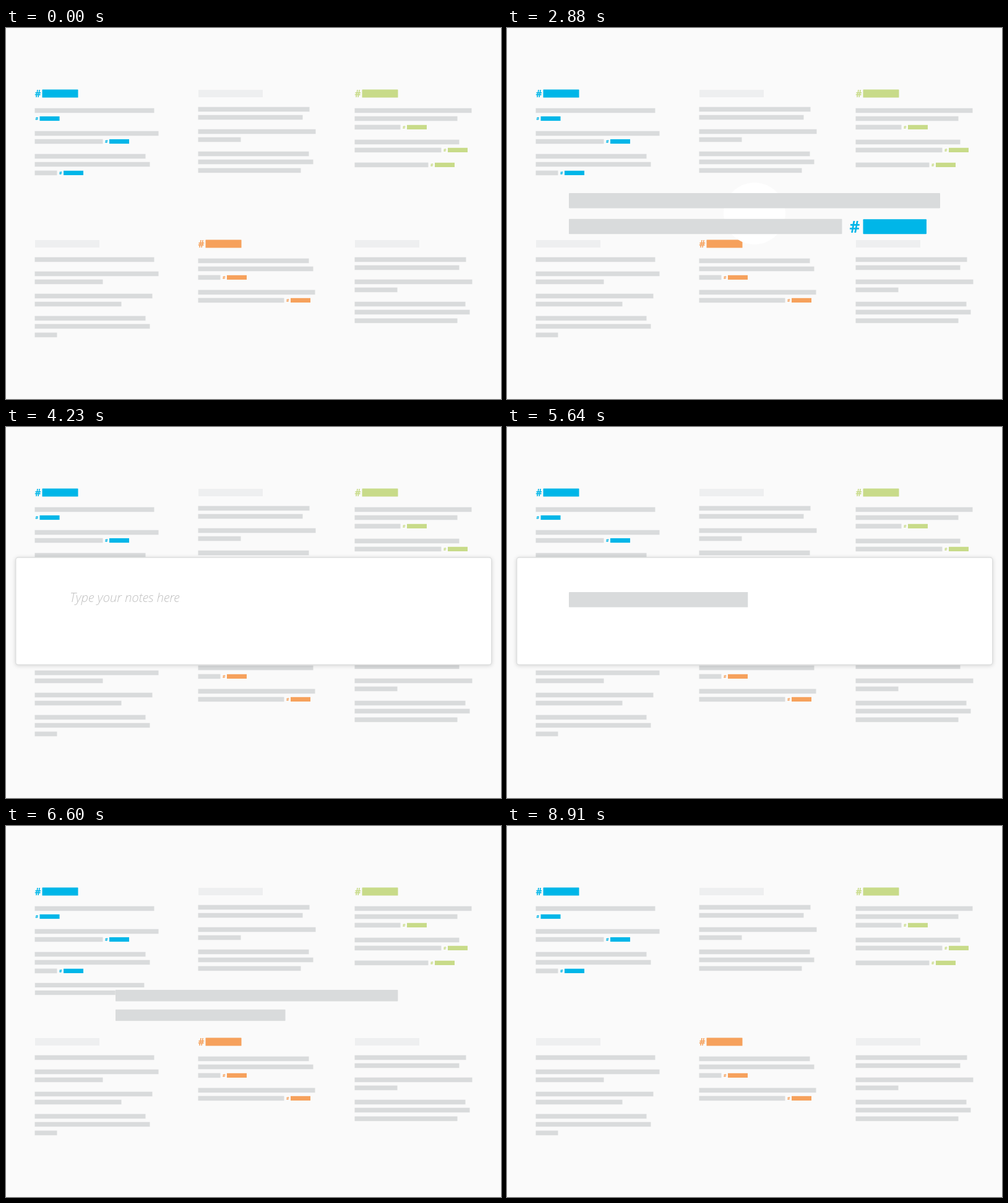
Recreate the animation shown at these times as an HTML page. Size 800 px wide and 600 px high, loop 9 s.

```html
<!DOCTYPE html>
<html lang="en">
<head>
<meta charset="utf-8">
<title>Notes</title>
<style>
html, body { margin: 0; width: 100%; height: 100%; overflow: hidden; background: #fafafa; }
svg { display: block; width: 800px; height: 600px; }
.hash { font-family: "Open Sans", "Noto Sans", sans-serif; font-weight: 700; }
.hint { font: italic 300 20.4px "Open Sans", Lato, sans-serif; fill: #c0c0c0; }
.card { fill: #fff; stroke: #dedfdf; stroke-width: 1.5; filter: drop-shadow(0 1px 3px rgba(0, 0, 0, .15)); }
</style>
</head>
<body>
<svg viewBox="0 0 800 600">
  <defs>
    <clipPath id="iris"><circle id="hole" cx="400" cy="300" r="0"/></clipPath>
  </defs>
  <g id="docs"></g>
  <g id="landed"></g>
  <g id="panel" clip-path="url(#iris)">
    <rect class="card" x="15.7" y="211" width="769" height="173.6" rx="4"/>
    <text id="hint" class="hint" x="103" y="283.3">Type your notes here</text>
  </g>
  <g id="notes"></g>
</svg>
<script>
const LOOP = 9000, STEP = 30, MOVE = 510;
const GREY = '#d9dbdc', PALE = '#eeeff0', BLUE = '#00b6e8', GREEN = '#c8db89', ORANGE = '#f6a15c';
const END_SCALE = 0.295;
const $ = id => document.getElementById(id);

function add(parent, tag, attrs, text) {
  const el = document.createElementNS('http://www.w3.org/2000/svg', tag);
  for (const k in attrs) el.setAttribute(k, attrs[k]);
  if (text) el.textContent = text;
  parent.appendChild(el);
  return el;
}

const bar = (parent, x, y, width, height, fill, rx = 0) =>
  add(parent, 'rect', { x, y, width, height, fill, rx });

const hash = (parent, x, y, size, fill) =>
  add(parent, 'text', { class: 'hash', x, y, 'font-size': size, fill }, '#');

// A document is a heading and paragraphs of line widths.
// With a colour, every paragraph ends in a tag.
function drawDoc(x, top, paragraphs, color) {
  const g = $('docs');
  if (color) {
    hash(g, x, top + 12.4, 15.5, color);
    bar(g, x + 12, top, 58, 13, color, .6);
  } else {
    bar(g, x + .5, top + .5, 104, 12, PALE);
  }
  let y = top + (color ? 34 : 32);
  for (const widths of paragraphs) {
    widths.forEach((w, i) => {
      if (i) y += i > 1 ? 13.9 : 13;
      bar(g, x, y - 3.8, w, 7.6, GREY);
    });
    if (color) {
      const last = widths[widths.length - 1];
      const tagX = x + last + (last ? 10.5 : 8);
      hash(g, tagX - 7.3, y + 2.8, 7.7, color);
      bar(g, tagX, y - 3.6, 32, 7.2, color);
    }
    y += color ? 24 : 23;
  }
}

const [LEFT, MIDDLE, RIGHT] = [46.5, 310.5, 563.5];
const [UPPER, LOWER] = [99.5, 342.5];
const long = last => [179, 186, last];
const plain = [[180, 169], [190, 69], long(166)];

drawDoc(LEFT, UPPER, [[193, 0], [200, 110], long(36)], BLUE);
drawDoc(MIDDLE, UPPER, plain);
drawDoc(RIGHT, UPPER, [[189, 166, 74], [169, 140], [119]], GREEN);
drawDoc(LEFT, LOWER, [[193], [200, 110], [190, 140], long(36)]);
drawDoc(MIDDLE, LOWER, [long(36), [189, 139]], ORANGE);
drawDoc(RIGHT, LOWER, plain);

// Coordinates inside a note are measured from its centre.
function makeNote(id, second, tagged) {
  const g = add($('notes'), 'g', {});
  const total = 600 + (tagged ? 578 : second);
  const masks = [-38, 4].map((y, i) => bar(add(g, 'clipPath', { id: id + i }), -300, y, 0, 34));
  const lines = [0, 1].map(i => add(g, 'g', { 'clip-path': `url(#${id + i})` }));
  bar(lines[0], -300, -33, 600, 24.5, GREY, 1);
  bar(lines[1], -300, 8.7, second, 24.5, GREY, 1);
  if (tagged) {
    hash(lines[1], 153.5, 30.8, 26, BLUE);
    bar(lines[1], 175.5, 9.2, 102.5, 24, BLUE, 1);
  }
  return { g, masks, total };
}

// The card opens, its hint clears, a note is typed, the card closes and the note flies off.
const scenes = [
  { ...makeNote('a', 441.5, true), open: 660, openSteps: 8, clear: 1620, type: 1770, typeSteps: 13,
    close: 2760, move: 2940, path: [[400, 300], [311.5, 288], [223, 276], [135, 263.5]] },
  { ...makeNote('b', 361, false), open: 4080, openSteps: 6, clear: 5430, type: 5580, typeSteps: 10,
    close: 6330, move: 6390, path: [[400, 300], [215, 65], [740, 680], [651, 501]] }
];

const clamp = v => Math.max(0, Math.min(1, v));
const ease = p => p < .5 ? 2 * p * p : 1 - 2 * (1 - p) * (1 - p);
const bezier = (a, b, c, d, t) => {
  const u = 1 - t;
  return a * u * u * u + 3 * b * u * u * t + 3 * c * u * t * t + d * t * t * t;
};

const progress = (s, t) => ease(clamp((t - s.move) / MOVE));
const place = (s, t) => [0, 1].map(i => bezier(...s.path.map(p => p[i]), progress(s, t)));

function irisRadius(s, t) {
  if (t < s.open) return 0;
  if (t >= s.close) return Math.max(0, 358 - 77 * (t - s.close) / STEP);
  return 47 + 390 * clamp((t - s.open) / STEP / (s.openSteps - 1));
}

function drawPanel(s, t) {
  const r = irisRadius(s, t);
  const [x, y] = place(s, t);
  $('hole').setAttribute('r', r);
  $('panel').style.display = r ? '' : 'none';
  $('panel').setAttribute('transform', `translate(${x - 400} ${y - 300})`);
  $('hint').style.display = t < s.clear ? '' : 'none';
}

function drawNote(s, t) {
  const layer = $(t >= s.move + MOVE ? 'landed' : 'notes');
  if (s.g.parentNode !== layer) layer.appendChild(s.g);
  s.g.style.display = t < s.type || t >= 8910 ? 'none' : '';
  const typed = s.total * clamp(((t - s.type) / STEP + 1) / s.typeSteps);
  s.masks[0].setAttribute('width', Math.min(typed, 600) + 1);
  s.masks[1].setAttribute('width', typed > 600 ? typed - 599 : 0);
  const [x, y] = place(s, t);
  const scale = 1 - (1 - END_SCALE) * progress(s, t);
  s.g.setAttribute('transform', `translate(${x} ${y}) scale(${scale})`);
  s.g.setAttribute('opacity', 1 - clamp((t - 8460) / 450));
}

function draw(time) {
  const t = Math.floor((time % LOOP) / STEP) * STEP;
  drawPanel(scenes[t < scenes[1].open ? 0 : 1], t);
  scenes.forEach(s => drawNote(s, t));
}

const start = performance.now();
function tick() {
  draw(performance.now() - start);
  requestAnimationFrame(tick);
}
tick();
</script>
</body>
</html>
```
